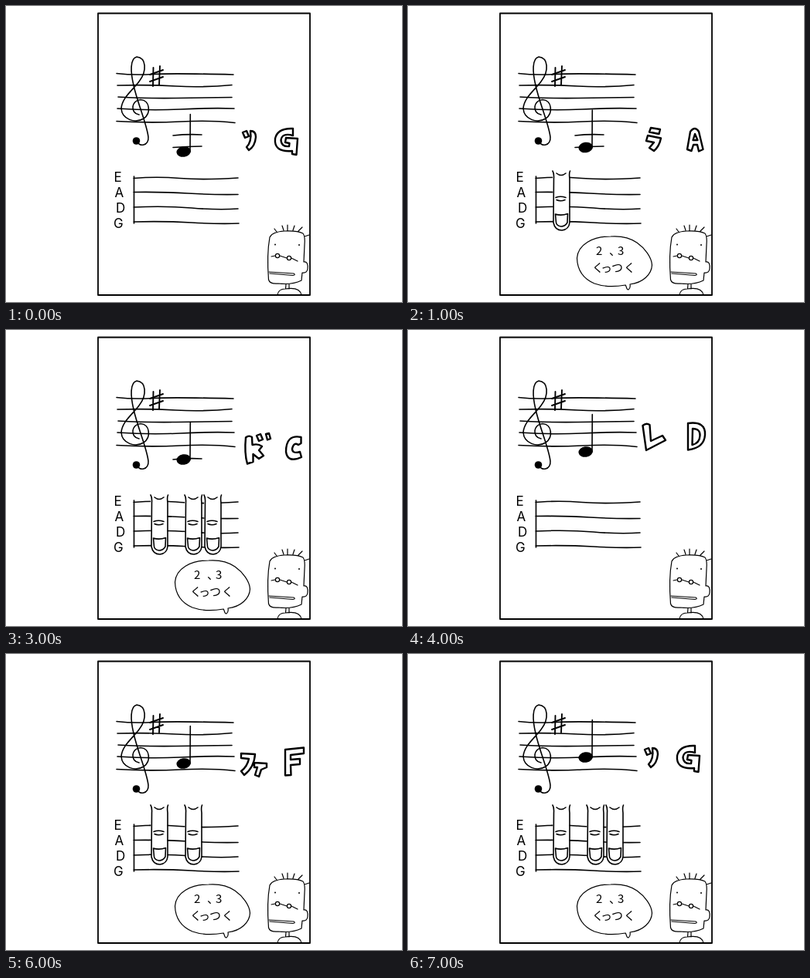
Write an HTML page that moves like this. It is 512 px wide and 384 px high and loops after 8000 ms.

```html
<!DOCTYPE html>
<html lang="ja">
<meta charset="utf-8">
<title>Scale fingering</title>
<style>
html, body { margin: 0; width: 100%; height: 100%; overflow: hidden; background: #fff }
svg { display: block; width: 100%; height: 100% }
path, rect, circle { fill: none; stroke: #000; stroke-width: 1.6; stroke-linecap: round; stroke-linejoin: round }
.dot { fill: #000; stroke: none }
.skin { fill: #fff; stroke: none }
.thin { stroke-width: 1.2 }
.bold { stroke-width: 2.4 }
.strings { font: 17px Inter, sans-serif }
.speech { font: 300 15px "Noto Sans CJK JP", "Noto Sans CJK", sans-serif }
</style>
<svg viewBox="0 0 512 384">
  <rect x="119" y="9.5" width="274" height="365.5" style="stroke-width:1.8"/>

  <!-- staff, clef and key signature -->
  <path d="M143 87.5Q165 90 190 88.5T294 89M144 103Q185 102 220 104T292 102.500M145 118Q180 120 220 119.500T292 118.500M144 133Q185 136 225 134T295 133M143 149.500Q185 152 225 150T296 151.500"/>
  <path d="M169 175C172 184 185 181 184 170C182 153 170 126 165 103C161 86 160 68 169 66C181 67 183 84 172 98C163 110 150 119 149 133C150 147 167 153 178 146C188 139 186 122 174 121.500C162 122 160 139 172 141"/>
  <circle class="dot" cx="168.500" cy="175" r="4.800"/>
  <path style="stroke-width:1.9" d="M190.500 80L190 104M199 78L198 102M186 89L203 83M186 98L203 92"/>

  <!-- note -->
  <path id="ledgerHigh" d="M216 168Q234 166 253 167"/>
  <path id="ledgerLow" d="M216 183.500Q234 182 253 182"/>
  <g id="note">
    <path d="M238 0L238.300 -48.500"/>
    <ellipse class="dot" cx="229.700" rx="9.300" ry="6.800" transform="rotate(-8 229.7 0)"/>
  </g>

  <!-- note names -->
  <path id="kana" class="bold"/>
  <path id="letter" class="bold"/>

  <!-- strings -->
  <g class="strings">
    <text x="139.500" y="227.500">E</text><text x="140.500" y="247.500">A</text>
    <text x="142" y="267.500">D</text><text x="139" y="287.500">G</text>
  </g>
  <path d="M165.500 221V282M165 223.500Q195 221 225 223.500T300 223M165 241.500Q205 241 235 243T300 244.500M165 261Q205 259 240 262T300 263M165 280Q205 279 240 281T301 282"/>
  <g id="fingers"></g>

  <!-- speech bubble -->
  <g id="bubble">
    <path class="thin" d="M281 362C283 364 282 368 285 368Q288 366 287 361C304 359 315 348 315.500 336C315 326 306 314 296 307C286 300 276 298 262 299C239 299 220 309 218.500 327C219 343 227 354 241 360Q258 366 281 362"/>
    <g class="speech">
      <text x="243 260 271" y="323">2、3</text>
      <text x="238 249 263 279" y="345">くっつく</text>
    </g>
  </g>

  <!-- onlooker -->
  <g>
    <path class="thin" d="M341 300Q344 293 360 292T384 295Q387 299 386 310L385 332Q391 331 390 341Q389 347 383 346L382 356Q370 362 352 360Q341 361 339.500 355Q337 322 341 300M386 299L392 297M350 293L347 289M359 291L357 285M364 291V284M371 291L373 285M378 292L383 287"/>
    <path class="thin" d="M343 325L348 324M354 324L363 327M369 327L377 331M340 345L372 347Q375 349 371 349.500L341 347M362 361L361.500 367M366 361V367M351 375Q352 367 361 367Q380 364 382 375"/>
    <circle class="thin" cx="351" cy="324" r="2.600"/><circle class="thin" cx="366" cy="327" r="2.600"/>
    <circle class="dot" cx="348" cy="309.500" r="1"/><circle class="dot" cx="379" cy="310" r="1"/>
  </g>
</svg>
<script>
const $ = id => document.getElementById(id);
const show = (el, on) => el.setAttribute('visibility', on ? 'visible' : 'hidden');

const finger = x => `<g transform="translate(${x})">
  <path class="skin" d="M1 214L2 282Q4 291 13 291Q22 290 22.500 281V214Z"/>
  <path d="M1 214Q3 217 2.500 224L2 281Q4 291 13 291Q22 290 23 281V224Q22 217 23.500 214M6 217Q12 222 18 217M5 248.500Q11 246 18 248.500M6 251.500Q11 254 17 251.500"/>
  <path d="M4.500 270Q12 272.500 20.500 269.500L20 281Q17 286 12 286Q6 285 5.500 281Z"/></g>`;
$('fingers').innerHTML = [186, 230, 255].map(finger).join('');

const so = y => `M306 ${y + 4}L311 ${y + 2}L314 ${y + 9}L309 ${y + 11}Z
  M316 ${y + 2}Q323 ${y + 2} 323 ${y + 10}Q322 ${y + 22} 314 ${y + 27}L311 ${y + 23}Q318 ${y + 16} 316 ${y + 2}Z`;
const bigG = y => `M348 ${y + 14}Q351 ${y} 371 ${y + 1}L371 ${y + 10}Q357 ${y + 6} 355.500 ${y + 16}
  Q356 ${y + 25} 366 ${y + 24}L366.500 ${y + 20}L361 ${y + 19}L362 ${y + 13}L377 ${y + 14}
  L375.500 ${y + 35}L370 ${y + 34}V${y + 30}Q346 ${y + 32} 348 ${y + 14}Z`;

// head height, outlined kana, outlined letter
const steps = [
  [189, so(160), bigG(158)],
  [183.500, 'M314 158L326 160L324.500 166L312 163.500ZM310 168L327 171.500Q325 182 318 188L312 184L318 177L308 175Z',
    'M361 186L365 163Q371 155 376 163L381.500 186L376 188.500L374 180H369L366.500 188ZM368.500 174L371 166L374.500 174Z'],
  [176, 'M311 146L319 149L317 155L309 152ZM308 157L317 160L315 166L307 163ZM309 171Q320 171 326 156L331 159Q326 177 310 178Z',
    'M363 146Q382 142 381 153Q381 158 377 160Q387 164 383 172Q378 180 363 178ZM369 152V158Q380 153 369 152ZM369 164V172Q383 167 369 164Z'],
  [168, 'M310 139.500Q314 136 318 139L318.500 149Q326 147 331 151L327 156L333 163L327 167L319.500 161L319.500 171L312 173.500Q308 160 310 139.500ZM324 137L329 135L332 142L327 144ZM336 135L340 134L342 141L338 142.500Z',
    'M381.500 139Q362 135 362 158Q364 173 382 165L380 158Q370 161 370 154Q372 145 378 149L381.500 147Z'],
  [158, 'M303.500 124Q308 120 312.500 123L314 144L329 137L333 143L308 156Z',
    'M362 121Q385 118 384 136Q383 153 362 155.500ZM368 128L367.500 149Q377 147 377.500 137Q378 128 368 128Z'],
  [150, 'M316 127.500L331 132L330 138L314.500 133.500ZM317 140L325.500 142L323.500 149L315 147ZM312 151.500L333 160.500L329 166.500L309.500 158Z',
    'M360 132L381 129.500L382 136L367.500 138V143L376 142L377 149L368 150V156.500L381 153.500L382.500 160L361 163.500Z'],
  [142, 'M304 129L322 130Q321 147 308 157L304 152Q312 146 314 136L304 135ZM321 141L337 142L337 147L330 150L327 159L322 157L325 147H321Z',
    'M361 124L385 121.500V129L368 131V137L380 136V143L368 144L368.500 157L361 157.500Z'],
  [134, so(120), bigG(118)],
];

function draw() {
  const step = Math.floor(performance.now() / 1000) % steps.length;
  const [head, kana, letter] = steps[step];
  $('note').setAttribute('transform', `translate(0 ${head})`);
  $('kana').setAttribute('d', kana);
  $('letter').setAttribute('d', letter);
  show($('ledgerHigh'), step < 4);
  show($('ledgerLow'), step < 2);
  show($('bubble'), step % 4);
  // four notes per string; the second string is played higher up
  $('fingers').setAttribute('transform', `translate(0 ${step < 4 ? 0 : -18})`);
  [...$('fingers').children].forEach((el, i) => show(el, i < step % 4));
  requestAnimationFrame(draw);
}
draw();
</script>
</html>
```
